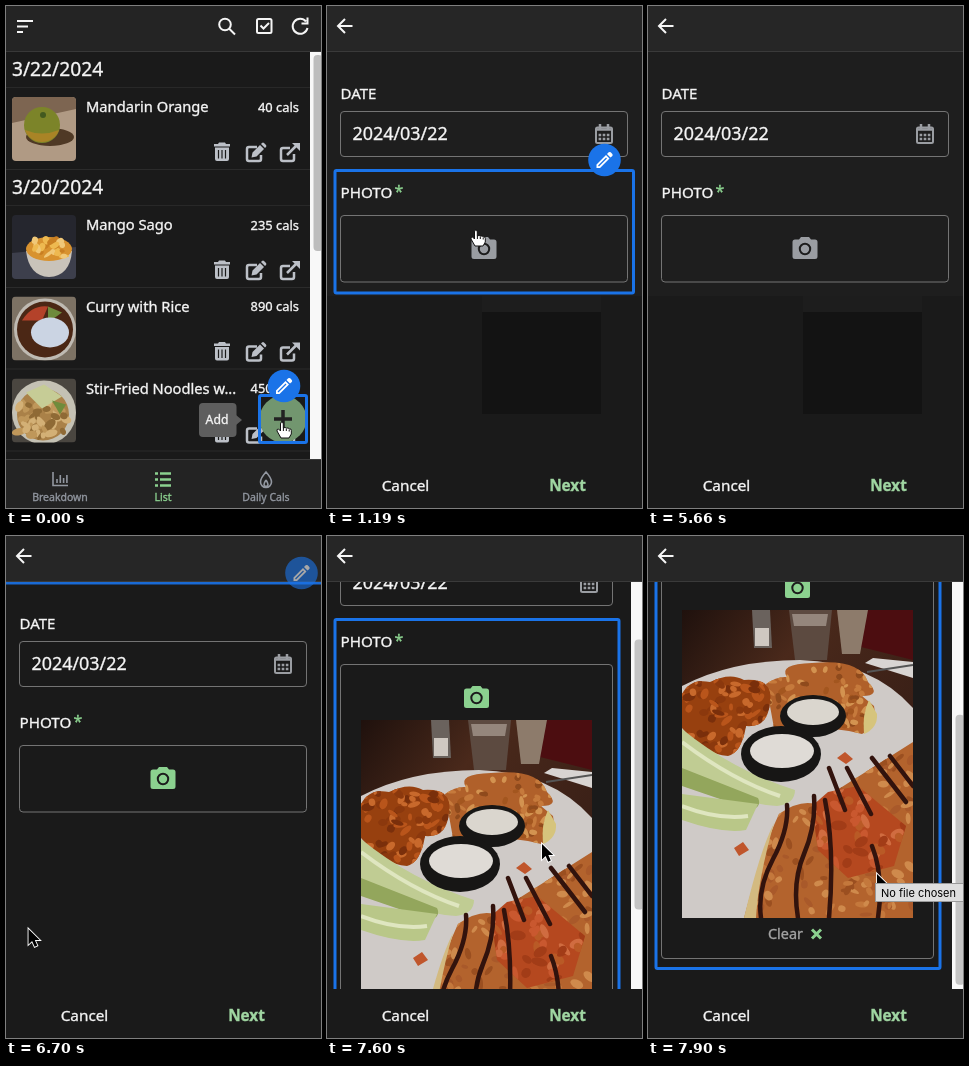
Write an HTML page that moves like this. It is 315 by 502 pixels and loops after 8000 ms.

```html
<!DOCTYPE html>
<html lang="en">
<head>
<meta charset="utf-8">
<title>Food log</title>
<style>
html, body { margin: 0; width: 100%; height: 100%; overflow: hidden; background: #1a1a1a; }
svg { display: block; color: #f5f5f5; }
text { font-family: "Noto Sans", "Open Sans", sans-serif; fill: currentColor; stroke: currentColor; stroke-width: .35px; }
.line { fill: none; stroke: currentColor; stroke-width: 2; }
.bold { stroke-width: 2.5; }
.thin { stroke-width: 1.6; }
.fill { fill: currentColor; }
.mid { text-anchor: middle; }
.end { text-anchor: end; }
.box { fill: none; stroke: #747474; }
.nav text { font-size: 10.5px; }
</style>
</head>
<body>
<svg width="315" height="502" viewBox="0 0 315 502">
<defs>
  <clipPath id="view"><rect y="46" width="315" height="407"/></clipPath>
  <clipPath id="thumb"><rect width="64" height="64" rx="4"/></clipPath>
  <clipPath id="frame"><rect width="231" height="308"/></clipPath>
  <linearGradient id="wood" x2="1" y2="1">
    <stop stop-color="#1f110d"/><stop offset=".3" stop-color="#4a291b"/><stop offset="1" stop-color="#2b1713"/>
  </linearGradient>
  <path id="wings" d="M0 84Q8 68 28 72 48 62 62 70 92 68 88 92 86 118 64 116 60 142 46 146 22 144 0 118z"/>
  <path id="strips" d="M84 74Q95 66 105 67 96 54 130 53 178 48 186 72 200 86 180 86L192 96Q196 116 180 124 150 116 92 118z"/>
  <path id="bread" d="M62 308Q80 240 97 204q20-14 36-10L231 132V308z"/>
  <path id="salsa" d="M130 196l16-14 30-6 48 40-12 40-46 12-30-28z"/>
  <clipPath id="inWings"><use href="#wings"/></clipPath>
  <clipPath id="inStrips"><use href="#strips"/></clipPath>
  <clipPath id="inBread"><use href="#bread"/></clipPath>
  <clipPath id="inSalsa"><use href="#salsa"/></clipPath>

  <g id="trash" class="fill">
    <path d="M-8-8h4l1-1.500h6l1 1.500h4v2.500h-16zM-7-4.500h14v11.500q0 2-2 2h-10q-2 0-2-2z"/>
    <path d="M-3.500-2v8.500M0-2v8.500M3.500-2v8.500" stroke="#1b1b1b" stroke-width="1.200"/>
  </g>
  <g id="edit">
    <path class="line bold" d="M1-6h-8q-2 0-2 2v10q0 2 2 2h10q2 0 2-2v-4"/>
    <path class="fill" d="M-4.500 4.500l1-5 7.500-7.500 4 4-7.500 7.500zM5-9l1-1q1-.8 2 0l2 2q.8 1 0 2l-1 1z"/>
  </g>
  <g id="open">
    <path class="line bold" d="M0-5h-7q-2 0-2 2v9q0 2 2 2h9q2 0 2-2v-5M-3 2l10-10"/>
    <path class="fill" d="M2-10h8v8z"/>
  </g>
  <g id="cam">
    <path class="fill" d="M-10-9h4l2-2.500h8l2 2.500h4q2.500 0 2.500 2.500v14.500q0 2.500-2.500 2.500h-20q-2.500 0-2.500-2.500v-14.500q0-2.500 2.500-2.500z"/>
    <circle cy=".5" r="5.200" fill="none" stroke="#1c1c1c" stroke-width="2"/>
  </g>
  <g id="badge">
    <circle r="16.300" fill="#1a73e8"/>
    <path fill="#fff" d="M-8 8v-3.500l9.500-9.500 3.500 3.500-9.500 9.500zM2.500-6l1.700-1.700q1-.8 2 0l1.600 1.600q.8 1 0 2l-1.800 1.600z"/>
    <path d="M-6 6L2-2" stroke="#1a73e8" stroke-width="1.300"/>
  </g>
  <path id="arrow" d="M0 0v15.500l3.600-3.400 2.600 5.700 2.600-1.200-2.500-5.500h4.900z" fill="#000" stroke="#fff" stroke-width="1.800" paint-order="stroke"/>
  <g id="hand" stroke="#111">
    <path fill="#fff" d="M-3 8L-7 1q-.5-2 1.500-2l2 2V-6q0-2 1.400-2t1.400 2V-2q2-1.200 3 .2 2-.8 3 .6 2-.4 2 1.700V4L5 8z"/>
    <path d="M-.6-2v3M2.300-1v2M5.200-.5v2" fill="none"/>
  </g>
</defs>

<rect width="315" height="502" fill="#1a1a1a"/>

<g id="list">
  <g id="rows" clip-path="url(#view)"></g>
  <rect x="304" y="46" width="11" height="407" fill="#f8f8f8"/>
  <rect x="307.500" y="49" width="9" height="196" rx="4" fill="#bdbdbd"/>
  <rect width="315" height="45" fill="#242424"/>
  <path d="M0 45.500h315" stroke="#383838"/>
  <g class="line">
    <path d="M11 15h16M11 20.500h11M11 26h6"/>
    <circle cx="219" cy="18.500" r="5.800"/><path d="M223 22.500l6 6"/>
    <rect x="251" y="13" width="14.500" height="14" rx="1.500"/><path d="M254.500 19.500l3 3 5.500-5.500"/>
    <path d="M300 15.500a7.500 7.500 0 1 0 1.500 6.500M301.500 11.500v6h-6"/>
  </g>
  <g class="nav">
    <rect y="453" width="315" height="49" fill="#232323"/>
    <path d="M0 453.500h315" stroke="#3b3b3b"/>
    <g color="#9297a0">
      <path class="line thin" d="M47 466v13.500h15M51 477v-4M54.300 477v-8M57.600 477v-5M60.900 477v-8"/>
      <text class="mid" x="54" y="495">Breakdown</text>
      <path class="line thin" d="M260 466q-5.500 6-5.500 10a5.500 5.500 0 0 0 11 0q0-4-5.500-10zM260 474q-2 3-2 4.500t2 2q2-.5 2-2t-2-4.500"/>
      <text class="mid" x="260" y="495">Daily Cals</text>
    </g>
    <g color="#8bd18f">
      <path class="line bold" d="M149 467.500h3M154 467.500h11M149 473.500h3M154 473.500h11M149 479.500h3M154 479.500h11"/>
      <text class="mid" x="157" y="495">List</text>
    </g>
  </g>
  <circle cx="277" cy="413" r="23.500" fill="#72966f"/>
  <path d="M268 413h18M277 404v18" stroke="#222" stroke-width="3.500"/>
  <circle id="ripple" cx="277" cy="413" r="23" fill="#fff" opacity="0"/>
  <g id="add">
    <rect x="193" y="397" width="37.500" height="34" rx="4" fill="#5e5e5e"/>
    <path d="M230 409l6 5-6 5z" fill="#5e5e5e"/>
    <text class="mid" x="211" y="418" font-size="12.200">Add</text>
  </g>
</g>

<g id="form">
  <g id="shade">
    <path d="M0 46h315v244H0z" fill="#1e1e1e"/>
    <path d="M155 290h119v16H155z" fill="#1d1d1d"/>
    <path d="M155 306h119v102H155z" fill="#131313"/>
  </g>
  <g clip-path="url(#view)">
    <g id="page">
      <text x="13.500" y="92.500" font-size="15">DATE</text>
      <rect class="box" id="dateBox" x="13.500" y="105.500" height="45" rx="3.500"/>
      <text x="25.500" y="134" font-size="17.900">2024/03/22</text>
      <g id="cal" color="#9a9da2">
        <rect class="line" x="-8" y="-6.500" width="16" height="15.500" rx="1.500"/>
        <path class="line bold" d="M-8-4.500h16M-4-10v5M4-10v5"/>
        <path class="line bold" stroke-dasharray="2.600 1.500" d="M-5.400 1h11M-5.400 5h11"/>
      </g>
      <text x="13.500" y="191.500" font-size="15.200">PHOTO</text>
      <text x="67.500" y="191" font-size="16" color="#8bd18f">*</text>
      <rect class="box" id="photoBox" x="13.500" y="209.500" rx="3.500"/>
      <use id="camera" href="#cam"/>
      <g id="photo">
        <g transform="translate(34 265)" clip-path="url(#frame)">
          <rect width="231" height="308" fill="url(#wood)"/>
          <path d="M180 0h51v50l-56-14z" fill="#4c0d10"/>
          <path d="M70 0h18l2 38H72z" fill="#6a625d"/><path d="M73 18h14v18H73z" fill="#cfc8c1"/>
          <path d="M107 0h43l-5 50h-32z" fill="#5c4a40"/><path d="M110 4h36l-2 12h-32z" fill="#94867c"/>
          <path d="M155 0h31l-8 44h-18z" fill="#8d7b6b"/>
          <path d="M0 76Q50 50 118 50 190 52 231 98V308H0z" fill="#cfcac7"/>
          <path d="M183 53l48 15v-16l-40-4z" fill="#d8d4d2"/><path d="M185 62l46-7" stroke="#555" stroke-width="2"/>
          <use href="#strips" fill="#b0602a"/><g id="stripCrumbs" clip-path="url(#inStrips)"></g>
          <use href="#wings" fill="#97400f"/><g id="wingCrumbs" clip-path="url(#inWings)"></g>
          <path d="M182 124q14-6 13-20l-8-14q-7 14-5 34z" fill="#d6c47c"/>
          <path d="M0 119Q50 160 113 180q0 14-18 16Q40 192 0 158z" fill="#c0cc93"/>
          <path d="M0 158l76 30q4 8-6 12L0 176z" fill="#93a65c"/>
          <path d="M0 184l76 10-12 26q-24 4-64-10z" fill="#b9c788"/>
          <path d="M0 132q50 38 98 54M0 196q36 14 66 10" fill="none" stroke="#dfe6c0" stroke-width="4"/>
          <ellipse cx="131" cy="106" rx="33" ry="21" fill="#171615"/><ellipse cx="131" cy="102" rx="26" ry="13" fill="#dad6ce"/>
          <ellipse cx="99" cy="144" rx="40" ry="28" fill="#171615"/><ellipse cx="100" cy="141" rx="32" ry="17" fill="#dfdbd6"/>
          <use href="#bread" fill="#b3632d"/><g id="breadCrumbs" clip-path="url(#inBread)"></g>
          <path d="M92 213Q76 270 74 308h-12Q78 240 92 213z" fill="#d3ba80"/>
          <use href="#salsa" fill="#b5481f"/><g id="salsaCrumbs" clip-path="url(#inSalsa)"></g>
          <path d="M155 148l8-6 8 7-7 5zM52 238l9-6 6 8-10 6z" fill="#c0562c"/>
          <path d="M105 195q2 24-14 54t-12 59M132 186q2 30-10 58t-6 64M147 158l16 42M143 190q10 50 4 118M165 158l24 46M190 148l34 44M208 146l23 30M190 236q12 30 6 72"
            fill="none" stroke="#32130d" stroke-width="4.500" stroke-linecap="round"/>
        </g>
        <text x="120" y="594" font-size="14.400" color="#a4a4a4">Clear</text>
        <path d="M164 584.500l9 9M173 584.500l-9 9" stroke="#8bd18f" stroke-width="3"/>
      </g>
    </g>
  </g>
  <g id="bar">
    <rect x="304" y="46" width="11" height="407" fill="#f8f8f8"/>
    <rect id="grip" x="307.500" width="9" height="270" rx="4" fill="#c4c4c4"/>
  </g>
  <rect width="315" height="45" fill="#262626"/>
  <path d="M0 45.500h315" stroke="#3a3a3a"/>
  <path class="line" d="M25.500 20H11M18 13l-7 7 7 7"/>
  <text class="mid" x="78.500" y="484.500" font-size="15.300">Cancel</text>
  <text class="mid" x="240.500" y="484.500" font-size="15.300" font-weight="700" color="#a0d6a2">Next</text>
</g>

<g clip-path="url(#view)"><rect id="outline" fill="none" stroke="#1a73e8" stroke-width="3" rx="1.500"/></g>
<use id="pencil" href="#badge"/>
<use id="cursor"/>
<g id="tip">
  <rect x="227.500" y="347.500" width="90" height="18" fill="#dedede" stroke="#9a9a9a"/>
  <text x="233" y="360.500" style="font:11px Inter,sans-serif;fill:#000;stroke:none">No file chosen</text>
</g>
</svg>

<script>
const $ = id => document.getElementById(id);
const set = (id, attrs) => { for (const k in attrs) $(id).setAttribute(k, attrs[k]); };
const show = (id, on) => { $(id).style.display = on ? "" : "none"; };
const at = (x, y) => `translate(${x} ${y})`;
const GREEN = "#8bd18f", GRAY = "#9a9da2";

let seed = 7;
const rand = n => (seed = seed * 16807 % 2147483647) / 2147483647 * n;
// Scatters n small tilted chips of the given colours over a box.
const crumbs = (n, x, y, w, h, size, colors) => Array.from({ length: n }, () =>
  `<ellipse transform="translate(${x + rand(w)} ${y + rand(h)}) rotate(${rand(180)})" rx="${size * (.5 + rand(.7))}" ry="${size * (.3 + rand(.4))}" fill="${colors[Math.floor(rand(colors.length))]}"/>`).join("");

$("wingCrumbs").innerHTML = crumbs(90, 0, 66, 90, 80, 6, ["#b9551b", "#7a2f0b", "#c8692c", "#8b380d"]);
$("stripCrumbs").innerHTML = crumbs(100, 84, 50, 110, 76, 5, ["#c67a3c", "#8f4a1c", "#d39350", "#a3561f"]);
$("breadCrumbs").innerHTML = crumbs(180, 62, 130, 170, 178, 6, ["#c4783c", "#9b4f20", "#a9592a", "#cf8a4c"]);
$("salsaCrumbs").innerHTML = crumbs(60, 126, 174, 100, 96, 7, ["#c9582f", "#a23c17", "#d06c40", "#b95a26"]);

const dish = {
  orange: `<path d="M0 0h64v64H0z" fill="#b09a84"/><path d="M0 0h64v12L0 26z" fill="#7d6551"/>
    <ellipse cx="38" cy="40" rx="24" ry="9" fill="#4f3925"/><circle cx="30" cy="28" r="18" fill="#7c8429"/>
    <path d="M13 33a18 18 0 0 0 34 0q-17 7-34 0z" fill="#a98426"/><circle cx="31" cy="18" r="3" fill="#43591f"/>`,
  mango: `<path d="M0 0h64v64H0z" fill="#25262e"/><path d="M0 38l64-6v32H0z" fill="#3d3f4c"/>
    <path d="M14 36h46q-2 25-23 26-20-1-23-26z" fill="#c9c3ba"/><ellipse cx="37" cy="34" rx="23" ry="12" fill="#d8922f"/>` +
    crumbs(22, 20, 25, 34, 17, 5, ["#eeb950", "#f0c878", "#c97f22"]),
  curry: `<path d="M0 0h64v64H0z" fill="#7d7264"/><circle cx="33" cy="33" r="31" fill="#bfbab2"/><circle cx="33" cy="33" r="28" fill="#4b2715"/>
    <path d="M10 24q10-16 26-14l-6 14z" fill="#b4422a"/><path d="M36 10l14 6-14 10z" fill="#6e8a3c"/>
    <ellipse cx="38" cy="36" rx="19" ry="15" fill="#cbd4e3"/>`,
  noodles: `<path d="M0 0h64v64H0z" fill="#4a4640"/><circle cx="32" cy="34" r="32" fill="#c4c1b4"/><circle cx="31" cy="36" r="26" fill="#aa8148"/>` +
    crumbs(45, 6, 26, 50, 32, 6, ["#d3b076", "#8f6a35", "#bf975a"]) +
    `<path d="M14 14l18-8 18 12-20 12z" fill="#c6cc96"/><path d="M40 22l14 4-6 10z" fill="#6f8c3c"/>`
};
const date = (y, label) => `<text x="6" y="${y + 24}" font-size="19.200">${label}</text>
  <path d="M0 ${y + 35.500}h304" stroke="#282828"/>`;
const meal = (y, name, cals, art) => `<g transform="${at(0, y)}">
  <g transform="${at(6, 9)}" clip-path="url(#thumb)">${art}</g>
  <text x="80" y="24" font-size="14.700">${name}</text>
  <text class="end" x="293" y="23.500" font-size="12.900">${cals} cals</text>
  <g color="#bcc0c7"><use href="#trash" x="216" y="64"/><use href="#edit" x="250" y="65"/><use href="#open" x="284" y="65"/></g>
  <path d="M0 81.500h304" stroke="#2b2b2b"/></g>`;
$("rows").innerHTML = date(46, "3/22/2024") + meal(82, "Mandarin Orange", 40, dish.orange) +
  date(164, "3/20/2024") + meal(200, "Mango Sago", 235, dish.mango) +
  meal(281.500, "Curry with Rice", 890, dish.curry) + meal(363.500, "Stir-Fried Noodles w...", 450, dish.noodles);

// Each step lists only what changes from its time on.
const steps = [
  [0, { page: "list", x: 278, y: 424, cur: "hand", mark: "fab", glow: 1, scroll: 0, cam: GRAY, ripple: 0, add: 1, shade: 0, tip: 0 }],
  [150, { ripple: .15 }],
  [300, { ripple: .08, add: 0 }],
  [450, { page: "form", cur: "arrow", mark: "" }],
  [740, { x: 270, y: 412 }],
  [890, { x: 262, y: 391 }],
  [1040, { x: 157, y: 306, shade: 1 }],
  [1190, { x: 151, y: 232, cur: "hand", mark: "field" }],
  [1330, { x: 146, y: 250 }],
  [1480, { x: 139, y: 265 }],
  [1770, { cam: GREEN }],
  [2070, { x: 79, y: 237 }],
  [2220, { cur: "" }],
  [2520, { cam: GRAY }],
  [5660, { mark: "" }],
  [6410, { x: 24, y: 466, cur: "arrow", mark: "body", glow: .25, cam: GREEN, shade: 0 }],
  [6560, { x: 23, y: 428, glow: .45 }],
  [6700, { x: 22.500, y: 393, glow: .6 }],
  [6850, { x: 62, y: 386, glow: 1 }],
  [7000, { x: 130, y: 358 }],
  [7150, { page: "photo", x: 190, y: 328, mark: "card" }],
  [7300, { x: 215, y: 308 }],
  [7450, { scroll: 30 }],
  [7600, { scroll: 81 }],
  [7750, { x: 222, y: 321, scroll: 135 }],
  [7900, { x: 229, y: 338, scroll: 191, tip: 1 }]
];
// x, y, width, height of the outline, then the badge centre
const marks = {
  fab: [253.500, 389.500, 47, 47, 278, 380],
  field: [8, 164.500, 298.500, 122.500, 277.500, 154],
  body: [-3, 47, 321, 600, 295.500, 37],
  card: [8, 164.500, 284, 459]
};

function draw(t) {
  const s = Object.assign({}, ...steps.filter(p => p[0] <= t).map(p => p[1]));
  const full = s.page === "photo", gap = full ? 15 : 0;
  show("list", s.page === "list");
  show("form", s.page !== "list");
  show("photo", full);
  show("bar", full);
  show("shade", s.shade);
  show("add", s.add);
  show("tip", s.tip);
  set("ripple", { opacity: s.ripple });

  set("page", { transform: at(0, -s.scroll) });
  set("dateBox", { width: 287 - gap });
  set("photoBox", { width: 287 - gap, height: full ? 404 : 66.500 });
  set("cal", { transform: at(277 - gap, 128) });
  set("camera", { transform: at(full ? 149.500 : 157, 242.500), color: s.cam });
  set("grip", { y: 48 + s.scroll * .685 });

  const m = marks[s.mark];
  show("outline", m);
  show("pencil", m && m[4]);
  if (m) {
    set("outline", { x: m[0], y: m[1] - s.scroll, width: m[2], height: m[3], opacity: Math.min(1, s.glow + .3) });
    set("pencil", { transform: at(m[4] || 0, m[5] || 0), opacity: s.glow });
  }
  show("cursor", s.cur);
  set("cursor", { href: "#" + s.cur, transform: at(s.x, s.y) });
}

function loop() {
  draw(performance.now() % 8000);
  requestAnimationFrame(loop);
}
loop();
</script>
</body>
</html>
```
